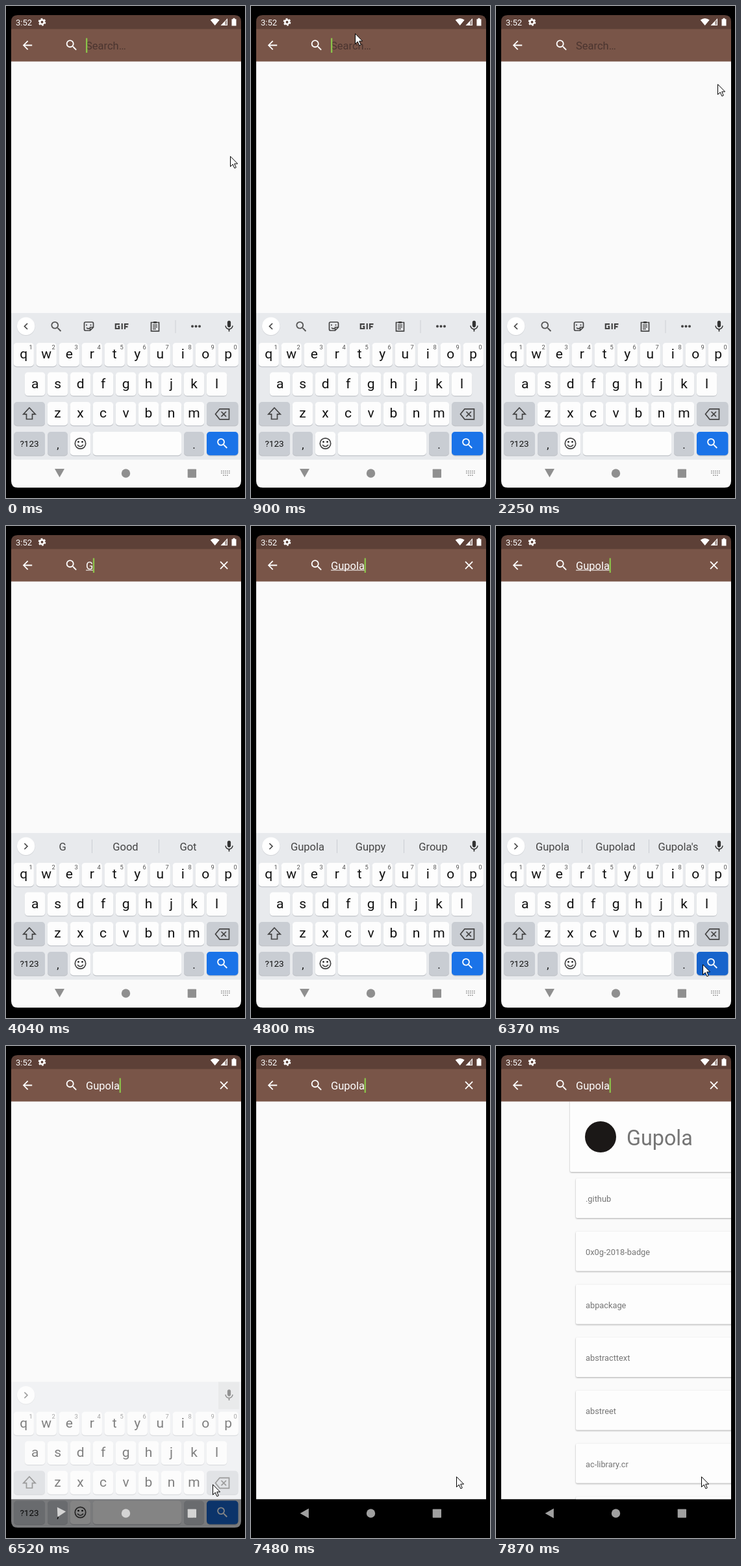
An HTML page that plays this animation: 368x758 px, repeating every 7990 ms.

```html
<!DOCTYPE html>
<html lang="en">
<head>
<meta charset="utf-8">
<title>Phone search</title>
<style>
html, body { margin: 0; width: 100%; height: 100%; overflow: hidden; background: #000; }
svg { display: block; width: 100%; height: 100%; font-family: Roboto, sans-serif; }
.mid { text-anchor: middle; }
.line { fill: none; stroke: #444; stroke-width: 1.7; }
.card { fill: #fdfdfd; filter: drop-shadow(0 1px 1px rgba(0,0,0,.32)); }
</style>
</head>
<body>
<svg viewBox="0 0 368 758">
  <defs>
    <clipPath id="screen"><path d="M8 742V24Q8 14 18 14H352Q362 14 362 24V732Q362 742 352 742H18Q8 742 8 732Z"/></clipPath>
    <clipPath id="page"><rect x="8" y="85.5" width="354" height="613"/></clipPath>
    <path id="find" d="M15.5 14h-.79l-.28-.27A6.47 6.47 0 0 0 16 9.5 6.5 6.5 0 1 0 9.5 16c1.61 0 3.09-.59 4.23-1.57l.27.28v.79l5 4.99L20.49 19l-4.99-5zm-6 0C7.01 14 5 11.99 5 9.5S7.01 5 9.5 5 14 7.01 14 9.5 11.99 14 9.5 14z"/>
    <path id="back" d="M20 11H7.83l5.59-5.59L12 4l-8 8 8 8 1.41-1.41L7.83 13H20z"/>
    <path id="close" d="M19 6.41L17.59 5 12 10.59 6.41 5 5 6.41 10.59 12 5 17.59 6.41 19 12 13.41 17.59 19 19 17.59 13.41 12z"/>
    <path id="mic" d="M12 14c1.66 0 3-1.34 3-3V5c0-1.66-1.34-3-3-3S9 3.34 9 5v6c0 1.66 1.34 3 3 3zm5.3-3c0 3-2.54 5.1-5.3 5.1S6.7 14 6.7 11H5c0 3.41 2.72 6.23 6 6.72V21h2v-3.28c3.28-.48 6-3.3 6-6.72z"/>
  </defs>
  <g clip-path="url(#screen)">
    <rect x="8" y="85" width="354" height="613.5" fill="#fafafa"/>
    <g clip-path="url(#page)"><g id="cards"></g></g>

    <rect x="8" y="14" width="354" height="22" fill="#5d4037"/>
    <rect x="8" y="35.5" width="354" height="50" fill="#795548"/>
    <g fill="#fff">
      <text x="15" y="29.5" font-size="13">3:52</text>
      <g fill="none" stroke="#fff">
        <circle cx="55.5" cy="24.7" r="3.2" stroke-width="2.5"/>
        <circle cx="55.5" cy="24.7" r="4.9" stroke-width="1.9" stroke-dasharray="2.8 2.331"/>
      </g>
      <path d="M321.7 30l-7-8.6q7-5 14 0zM330.5 30h10.5V19zM347.5 20.3h2v-1.5h3v1.5h2V30.5h-7z"/>
      <path d="M337.3 29v-5l2.7-2.8V29z" fill="#5d4037" opacity=".6"/>
    </g>
    <g id="bar" fill="#fff"></g>
    <text id="hint" x="123" y="66.5" font-size="16.5" fill="#4b3530">Search…</text>
    <text id="query" x="123" y="66.5" font-size="16.5" fill="#fff"></text>
    <rect id="under" x="123" y="67.6" height="1" fill="#fff"/>
    <rect id="caret" y="49.5" width="2.3" height="22.5" fill="#8bc34a"/>

    <rect id="nav" x="8" y="698.5" width="354" height="44"/>
    <g id="keyboard"></g>
    <g id="buttons">
      <path id="triangle" d="M75 713h15l-7.500 13.300z"/>
      <circle cx="184.500" cy="720" r="6.700"/>
      <rect x="279.700" y="713.500" width="13.300" height="13.300" rx=".8"/>
    </g>
    <path id="dots" d="M331 716.500h14M331 719.500h14M334 723h8" fill="none" stroke="#8f8f8f" stroke-width="1.700" stroke-dasharray="1.700 1.300"/>
  </g>
  <path id="pointer" d="M.5.700V16.400l3.700-3.500 2.700 6 2.400-1.100-2.600-5.800h4.900z" fill="#fff" stroke="#000"/>
</svg>
<script>
const $ = id => document.getElementById(id);
const LOOP = 7990;
const WORD = 'Gupola';

// 24-unit icon centred on x, y
const icon = (name, x, y, s = .9, fill = '') =>
  `<use href="#${name}" transform="translate(${x} ${y}) scale(${s}) translate(-12 -12)" ${fill && `fill="${fill}"`}/>`;
const label = (str, x, y, size, fill = '#111') =>
  `<text class="mid" x="${x}" y="${y}" font-size="${size}" fill="${fill}">${str}</text>`;

const box = (x, y, w, h, fill) => `<rect x="${x}" y="${y}" width="${w}" height="${h}" rx="5" fill="${fill}"/>`;
const key = (x, y, w, fill = '#fdfdfd', id = '') =>
  box(x, y + 1.2, w, 36.3, '#bfc2c7') + box(x, y, w, 36.3, fill).replace('<rect', `<rect id="${id}"`);

function letters(str, x, y, numbers) {
  return [...str].map((c, i) => {
    const cx = x + i * 35;
    return key(cx - 15.7, y, 31.4) + label(c, cx, y + 24.2, 21) +
      (numbers ? label((i + 1) % 10, cx + 11, y + 10, 9.3, '#555') : '');
  }).join('');
}

const GREY = '#c9cdd3';
$('keyboard').innerHTML = `
  <rect x="8" y="473" width="354" height="226" fill="#e8eaed"/>
  <rect id="micBack" x="327" y="473" width="32" height="42" fill="#000" opacity=".07"/>
  <circle cx="30.700" cy="494" r="14" fill="#d3d5d9"/><circle cx="30.700" cy="493.300" r="13.700" fill="#fff"/>
  <path id="chevron" class="line" d="M33 489l-4.500 4.500 4.500 4.500"/>
  <g id="tools">
    ${icon('find', 77.5, 494, .9, '#555')}
    <g class="line">
      <path d="M122.500 487h10q2 0 2 2v6l-5 5h-7q-2 0-2-2v-9q0-2 2-2zM134 495h-4.500v5M124 495.500q2 2.500 4.500 1"/>
      <path d="M124 490.500v2M130.500 490.500v2"/>
      <path stroke-width="2.200" d="M175 490.200h-6.200v6.800h5.400v-3.200h-2M178.700 489v9M183 498v-7.800h5.500M183 494.200h4.500"/>
      <path d="M223.500 487.500h12v13.300h-12zM226 491.500h7M226 494.500h7M226 497.500h5"/>
      <path stroke-width="3" d="M227 487.500h5"/>
      <path stroke="#cdd0d4" stroke-width="1" d="M261 484v20"/>
    </g>
    <g fill="#444"><circle cx="287" cy="493.500" r="2"/><circle cx="292.500" cy="493.500" r="2"/><circle cx="298" cy="493.500" r="2"/></g>
  </g>
  <g id="tips">
    <path stroke="#cbced3" d="M132.500 483v21M235.500 483v21"/>
    ${[87, 184, 280.5].map(x => label('', x, 500, 16.5, '#444')).join('')}
  </g>
  ${icon('mic', 343.5, 493.5, .88, '#333')}
  ${letters('qwertyuiop', 27.2, 519, true)}
  ${letters('asdfghjkl', 44.6, 564.3)}
  ${letters('zxcvbnm', 79.5, 610)}
  ${key(12, 610, 48, GREY)}${key(309, 610, 48.5, GREY)}
  <path class="line" d="M36 619l9.200 9.800h-4.700v7.700h-9v-7.700h-4.700z"/>
  <path class="line" d="M329 620.800h14.500v16H329l-6.500-8zM331.500 625l7.500 7.600M339 625l-7.500 7.600"/>
  ${key(12, 656, 48, GREY)}${label('?123', 36, 679.3, 13.5)}
  ${key(64, 656, 31, GREY)}${label(',', 80, 682, 17)}
  ${key(98.8, 656, 31.4)}${key(133.7, 656, 136.3)}
  ${key(274, 656, 31, GREY)}${label('.', 289.5, 682, 17)}
  ${key(309, 656, 48.5, '#1a73e8', 'go')}${icon('find', 333.3, 674, .9, '#fff')}
  <circle class="line" cx="114.500" cy="674" r="8.200"/>
  <path class="line" d="M110 676q4.500 5.500 9 0"/>
  <circle cx="111.500" cy="671.500" r="1.300"/><circle cx="117.500" cy="671.500" r="1.300"/>`;

$('bar').innerHTML = icon('back', 33, 60.5) + icon('find', 101, 60.5, .92) +
  `<g id="clear">${icon('close', 335.6, 60.5, .88)}</g>`;

const repos = ['.github', '0x0g-2018-badge', 'abpackage', 'abstracttext', 'abstreet', 'ac-library.cr', ''];
$('cards').innerHTML = `
  <rect class="card" x="114" y="76" width="354" height="118" rx="2"/>
  <circle cx="161" cy="140" r="24" fill="#1b1817"/>
  <text x="201" y="153" font-size="32.300" fill="#757575">${WORD}</text>` +
  repos.map((name, i) => {
    const y = 204 + i * 81.7;
    return `<rect class="card" x="123" y="${y}" width="340" height="61" rx="2"/>
      <text x="138" y="${y + 36.3}" font-size="12.800" fill="#757575">${name}</text>`;
  }).join('');

// Held values: [start time, value]
const away = [-50, -50];
const pointerAt = [[0, [345, 231]], [120, [132, 164]], [240, [46, 106]], [360, [100, 56]], [480, [150, 42]],
  [630, [160, 42]], [1180, [205, 62]], [1300, [256, 88]], [1450, [341, 120]], [2620, [343, 120]], [2740, away],
  [5980, [360, 688]], [6100, [346, 682]], [6250, [330, 678]], [6370, [318, 675]], [6950, [316, 663]]];
const caretOn = [[0, 1], [240, 0], [750, 1], [1300, 0], [1850, 1], [2250, 0], [2740, 1], [3330, 0],
  [3760, 1], [5510, 0], [5980, 1], [6950, 0], [7480, 1]];
const typed = [[0, 0], [3760, 1], [4160, 2], [4410, 3], [4530, 4], [4650, 5], [4800, 6]];
const tipWords = [[0, ''], [4040, 'G Good Got'], [4160, 'Gu Guess Guy'], [4410, 'Gup Guppy Group'],
  [4530, 'Gupo Guppy Group'], [4650, 'Gupol Guppy Group'], [4800, 'Gupola Guppy Group'],
  [4950, `${WORD} ${WORD}d ${WORD}'s`], [6520, '']];
const slide = [[0, 400], [7600, 190], [7750, 75], [7870, 0]];

const held = (list, t) => list.filter(([at]) => at <= t).pop()[1];
const show = (id, on) => $(id).style.display = on ? '' : 'none';
const put = (id, attrs) => { for (const k in attrs) $(id).setAttribute(k, attrs[k]); };
const tipTexts = $('tips').querySelectorAll('text');

function draw(t) {
  const n = held(typed, t);
  $('query').textContent = WORD.slice(0, n);
  const width = n ? $('query').getComputedTextLength() : 0;
  show('hint', !n);
  show('clear', n);
  put('under', { width: t < 6520 ? width : 0 });
  put('caret', { x: 123 + width - (n ? .4 : 0), opacity: held(caretOn, t) });

  const words = held(tipWords, t);
  tipTexts.forEach((el, i) => el.textContent = words.split(' ')[i] || '');
  show('tips', words);
  show('tools', t < 4040);
  put('chevron', { transform: t < 4040 ? '' : 'rotate(180 30.700 493.500)' });

  // The keyboard drops and fades while the bottom bar turns black
  const leaving = t >= 6520, gone = t >= 6670;
  show('keyboard', !gone);
  put('keyboard', { transform: `translate(0 ${leaving ? 44.5 : 0})`, opacity: leaving ? .52 : 1 });
  show('micBack', leaving);
  put('go', { fill: t >= 6370 ? '#1764cc' : '#1a73e8' });
  put('nav', { fill: leaving ? '#000' : '#fafafa' });
  put('buttons', { fill: gone ? '#a0a0a0' : leaving ? '#d4d4d4' : '#8f8f8f' });
  put('triangle', { transform: `rotate(${gone ? 90 : leaving ? 27 : 0} 82.200 719.700)` });
  show('dots', !leaving);

  put('cards', { transform: `translate(${held(slide, t)} 0)` });
  put('pointer', { transform: `translate(${held(pointerAt, t)})` });
}

const start = performance.now();
function tick() {
  draw((performance.now() - start) % LOOP);
  requestAnimationFrame(tick);
}
tick();
</script>
</body>
</html>
```
